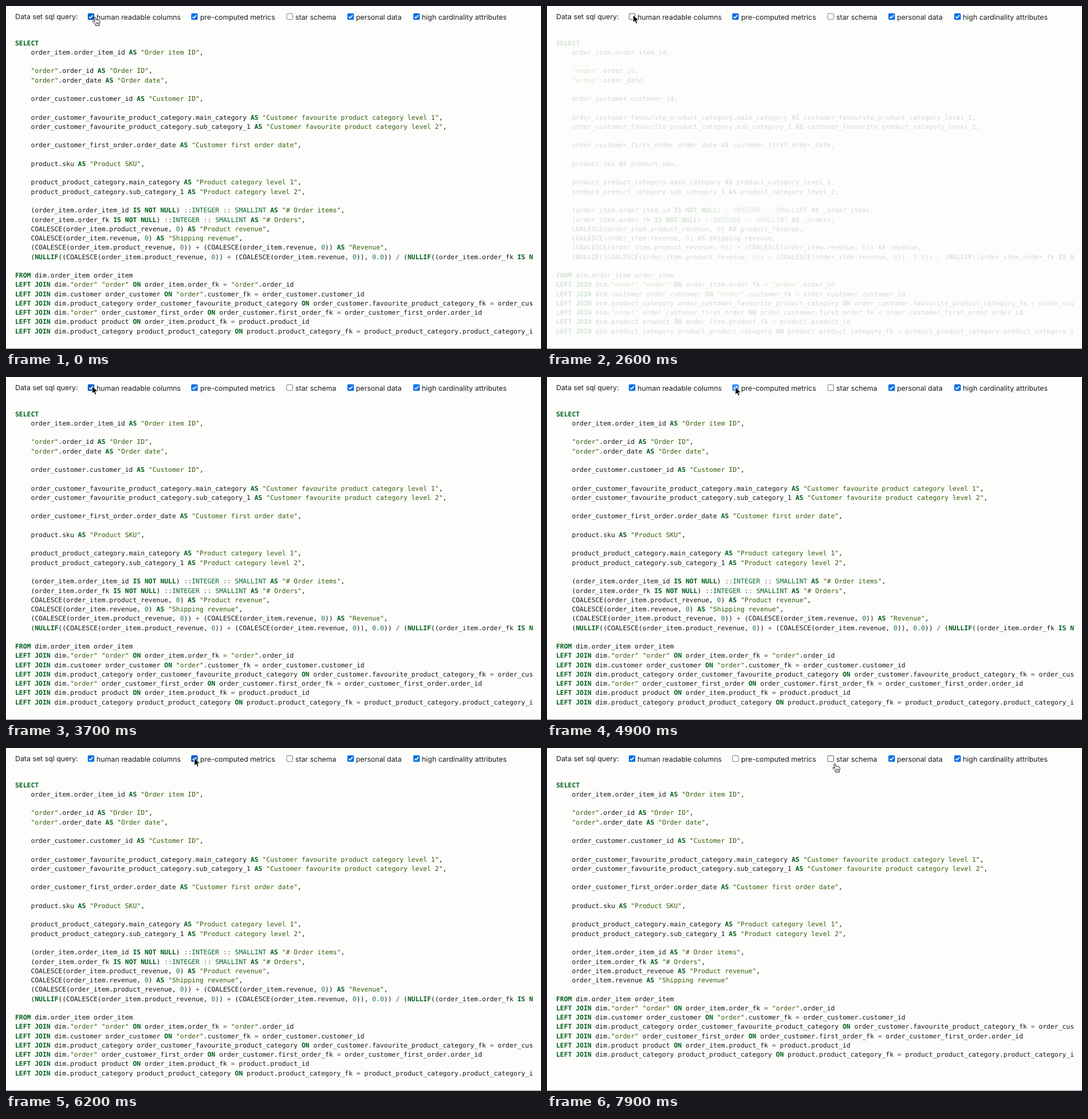
Animation, 934 px wide and 600 px high, one loop 8000 ms. Source, as an HTML page:

```html
<!DOCTYPE html>
<html lang="en">
<head>
<meta charset="utf-8">
<title>Data set query</title>
<style>
html, body { margin: 0; width: 100%; height: 100%; overflow: hidden; background: #fdfdfc; }
svg, pre { position: absolute; left: 0; top: 0; text-rendering: geometricPrecision; }
svg text { font: 12.36px Inter, sans-serif; fill: #1c1c1c; }
pre {
  left: 16px; top: 56.5px; width: 904px; height: 530px; margin: 0; overflow: hidden;
  font: 11.383px/16.27px "DejaVu Sans Mono", monospace; color: #151515;
}
pre b { color: #00601c; }
pre .str { color: #335c08; }
pre .type { color: #0c6a2c; }
pre .num { color: #207a50; }
pre .op { color: #555; }
</style>
</head>
<body>
<pre id="sql"></pre>
<svg id="stage" width="934" height="600" viewBox="0 0 934 600">
  <path d="M0 599.5H934" stroke="#858585"/>
  <text x="16" y="22.5">Data set sql query:</text>
  <g id="boxes"></g>
  <path id="arrow" d="M0 0V13.6L3.1 10.7L5.2 15.6L7.6 14.6L5.5 9.8H9.8Z"
    fill="#000" stroke="#fff" stroke-width="1" stroke-linejoin="round"/>
  <g id="hand" fill="#fff" stroke="#111" stroke-linejoin="round" stroke-linecap="round">
    <path d="M-1.5 1.2C-1.5 -.5 1 -.5 1.3 1.2L2.2 5C3 4 4.3 4.3 4.6 5.4C5.4 4.5 6.7 4.9 7 6C8 5.4 9.1 6 9.1 7.3C9.1 10 8.6 11 7.8 12.3V14.8H1.4V13.2C-.2 11.5 -1.4 9.7 -3.1 8.2C-4.2 7 -2.7 5.9 -1.5 6.7L-.2 7.7Z"/>
    <path d="M2.4 9V12M4.5 9V12M6.5 9V12" stroke-width=".8"/>
  </g>
</svg>
<script>
const $ = id => document.getElementById(id);
const LOOP = 8000;

const options = [
  ['human readable columns', 148.5, 158],
  ['pre-computed metrics', 329, 339],
  ['star schema', 495.2, 505],
  ['personal data', 601.7, 611],
  ['high cardinality attributes', 716.7, 726]
];

const columns = [
  ['order_item.order_item_id', 'Order item ID'],
  [],
  ['"order".order_id', 'Order ID'],
  ['"order".order_date', 'Order date'],
  [],
  ['order_customer.customer_id', 'Customer ID'],
  [],
  ['order_customer_favourite_product_category.main_category', 'Customer favourite product category level 1'],
  ['order_customer_favourite_product_category.sub_category_1', 'Customer favourite product category level 2'],
  [],
  ['order_customer_first_order.order_date', 'Customer first order date'],
  [],
  ['product.sku', 'Product SKU'],
  [],
  ['product_product_category.main_category', 'Product category level 1'],
  ['product_product_category.sub_category_1', 'Product category level 2'],
  []
];

const product = 'COALESCE(order_item.product_revenue, 0)';
const shipping = 'COALESCE(order_item.revenue, 0)';
const flag = name => `(order_item.${name} IS NOT NULL) ::INTEGER :: SMALLINT`;
const metrics = [
  [flag('order_item_id'), '# Order items'],
  [flag('order_fk'), '# Orders'],
  [product, 'Product revenue'],
  [shipping, 'Shipping revenue'],
  [`(${product}) + (${shipping})`, 'Revenue'],
  [`(NULLIF((${product}) + (${shipping}), 0.0)) / (NULLIF((order_item.order_fk IS NOT NULL)`, 'AOV']
];
const facts = [
  ['order_item.order_item_id', '# Order items'],
  ['order_item.order_fk', '# Orders'],
  ['order_item.product_revenue', 'Product revenue'],
  ['order_item.revenue', 'Shipping revenue']
];

const joins = `FROM dim.order_item order_item
LEFT JOIN dim."order" "order" ON order_item.order_fk = "order".order_id
LEFT JOIN dim.customer order_customer ON "order".customer_fk = order_customer.customer_id
LEFT JOIN dim.product_category order_customer_favourite_product_category ON order_customer.favourite_product_category_fk = order_customer_favourite_product_category.product_category_id
LEFT JOIN dim."order" order_customer_first_order ON order_customer.first_order_fk = order_customer_first_order.order_id
LEFT JOIN dim.product product ON order_item.product_fk = product.product_id
LEFT JOIN dim.product_category product_product_category ON product.product_category_fk = product_product_category.product_category_id`;

function column([expr, label], human) {
  if (!expr) return '';
  const plain = label.toLowerCase().replace(/\W+/g, '_');
  if (human) return `    ${expr} AS "${label}",`;
  return '    ' + expr + (expr.endsWith('.' + plain) ? '' : ' AS ' + plain) + ',';
}

function query(human, computed) {
  const rows = [...columns, ...(computed ? metrics : facts)].map(c => column(c, human));
  return 'SELECT\n' + rows.join('\n').slice(0, -1) + '\n\n' + joins;
}

const token = /("[^"]*")|\b(SELECT|AS|IS|NOT|NULL|FROM|LEFT|JOIN|ON|NULLIF)\b|\b(INTEGER|SMALLINT)\b|\b(\d[\d.]*)\b|(::|[=+\/])/g;
const highlight = sql => sql.replace(token, (m, str, key, type, num) =>
  key ? `<b>${m}</b>` : `<span class="${str ? 'str' : type ? 'type' : num ? 'num' : 'op'}">${m}</span>`);

// Each click: time, then the state of the first two options after it.
const clicks = [[700, 0, 1], [2450, 1, 1], [4950, 1, 0], [5600, 1, 1], [6800, 1, 0]];
const stateAt = t => clicks.reduce((s, [at, ...next]) => t >= at ? next : s, [1, 1]);

// Cursor moves: start, end, from x, y, to x, y.
const moves = [
  [0, 400, 155, 19.5, 150.3, 15.5],
  [4050, 4650, 150.3, 15.5, 328.8, 17.5],
  [7300, 7800, 328.8, 17.5, 502.3, 27.5]
];

const clamp = v => Math.max(0, Math.min(1, v));
const ease = v => v * v * (3 - 2 * v);

function opacityAt(t) {
  return clicks.reduce((o, [at]) => {
    const d = t - at;
    return d < 0 || d > 500 ? o : 1 - 0.84 * Math.min(clamp(d / 150), clamp((500 - d) / 200));
  }, 1);
}

function drawBox([label, x, textX], i, on, hover, pressed) {
  const blue = pressed ? '#3793ff' : hover ? '#005cc8' : '#0870e8';
  const mark = on
    ? `<rect x="${x - 5.7}" y="12.8" width="11.4" height="11.4" rx="2" fill="${blue}"/>
       <path d="M${x - 3.3} 18.8l2.2 2.3l4.4 -5" fill="none" stroke="#fff" stroke-width="1.7"/>`
    : `<rect x="${x - 5.2}" y="13.3" width="10.4" height="10.4" rx="1.8" fill="#fff" stroke="${hover ? '#555' : '#767676'}"/>`;
  return `${mark}<text x="${textX}" y="24">${label}</text>`;
}

let shownSql, shownBoxes;
function draw(t) {
  const sql = query(...stateAt(t - 300));
  if (sql !== shownSql) $('sql').innerHTML = highlight(shownSql = sql);
  $('sql').style.opacity = opacityAt(t);

  const [start, end, x0, y0, x1, y1] = moves.filter(m => t >= m[0]).pop();
  const k = ease(clamp((t - start) / (end - start)));
  const x = x0 + (x1 - x0) * k, y = y0 + (y1 - y0) * k;
  const pointing = k < 1 || y1 > 25;
  $('arrow').style.display = pointing ? 'none' : '';
  $('hand').style.display = pointing ? '' : 'none';
  $(pointing ? 'hand' : 'arrow').setAttribute('transform', `translate(${x} ${y})`);

  const checked = [...stateAt(t - 200), 0, 1, 1];
  const pressed = clicks.some(([at]) => t >= at - 100 && t < at + 200);
  const html = options.map((o, i) => {
    const hover = Math.abs(x - o[1]) < 9;
    return drawBox(o, i, checked[i], hover, hover && pressed);
  }).join('');
  if (html !== shownBoxes) $('boxes').innerHTML = shownBoxes = html;
}

function tick() {
  draw(Math.floor(performance.now() % LOOP / 100) * 100);
  requestAnimationFrame(tick);
}
tick();
</script>
</body>
</html>
```
